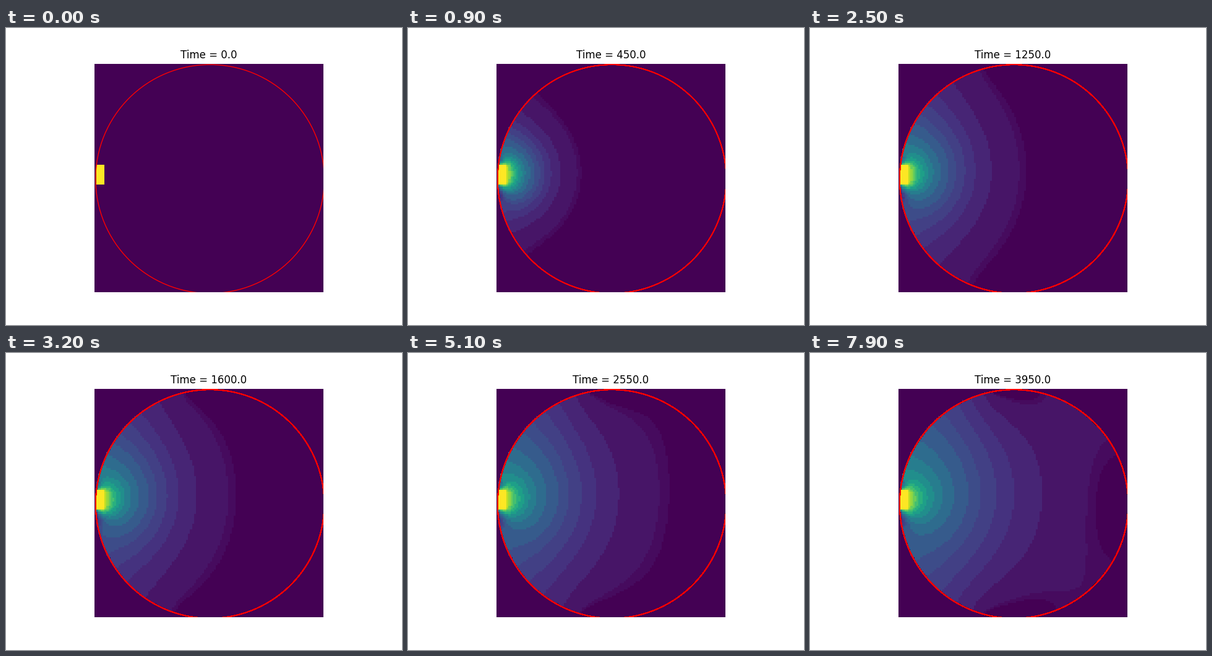
Animation of 640x480 px, one loop 8000 ms. Source, as a matplotlib script:

```python
import numpy as np
import matplotlib.pyplot as plt
from matplotlib.animation import FuncAnimation

N = 115              # cells per side
FRAMES = 80
DT_FRAME = 50.0      # model time per frame
D = 0.5              # diffusivity, cells^2 per time unit
R = N / 2
STEP = 0.2           # D * dt of one explicit step
SUBSTEPS = round(DT_FRAME * D / STEP)

# Colour bands: limits and the value shown inside each band
LIMITS = np.array([0.027, 0.034, 0.08, 0.125, 0.165, 0.21, 0.255, 0.32, 0.39,
                   0.46, 0.53, 0.60, 0.67, 0.74, 0.81, 0.87, 0.93, 0.975])
SHADES = np.concatenate([[0], (LIMITS[:-1] + LIMITS[1:]) / 2, [1]])


def simulate():
    """Diffusion from a fixed patch in a disc with no-flux walls.

    The border of the square grid is held at zero, so the disc leaks
    where it touches the grid edge.
    """
    y, x = np.mgrid[:N, :N]
    disc = (x - R) ** 2 + (y - R) ** 2 <= R ** 2
    edge = np.zeros((N, N), bool)
    edge[[0, -1], :] = edge[:, [0, -1]] = True
    patch = np.zeros((N, N), bool)
    patch[51:61, 1:5] = True

    wet = disc | edge
    link_x = STEP * (wet[:, 1:] & wet[:, :-1])
    link_y = STEP * (wet[1:] & wet[:-1])
    free = (disc & ~edge & ~patch).astype(float)

    u = patch.astype(float)
    states = [u.copy()]
    change = np.empty_like(u)
    for _ in range(FRAMES - 1):
        for _ in range(SUBSTEPS):
            flow_x = (u[:, 1:] - u[:, :-1]) * link_x
            flow_y = (u[1:] - u[:-1]) * link_y
            change[:] = 0
            change[:, :-1] += flow_x
            change[:, 1:] -= flow_x
            change[:-1] += flow_y
            change[1:] -= flow_y
            change *= free
            u += change
        states.append(u.copy())
    return states


bands = [SHADES[np.digitize(u, LIMITS)] for u in simulate()]

fig, ax = plt.subplots(figsize=(6.4, 4.8), dpi=100)
ax.axis("off")
image = ax.imshow(bands[0], cmap="viridis", vmin=0, vmax=1,
                  interpolation="nearest")
title = ax.set_title("Time = 0.0")

# One more outline is stacked per frame, so its soft rim hardens
rings = [ax.add_patch(plt.Circle((R, R), R, color="red", fill=False))
         for _ in range(FRAMES)]


def update(i):
    image.set_data(bands[i])
    title.set_text(f"Time = {i * DT_FRAME:.1f}")
    for k, ring in enumerate(rings):
        ring.set_visible(k <= i)
    return [image, title, *rings]


anim = FuncAnimation(fig, update, frames=FRAMES, interval=100,
                     repeat=True, repeat_delay=0, blit=False)
plt.show()
```
